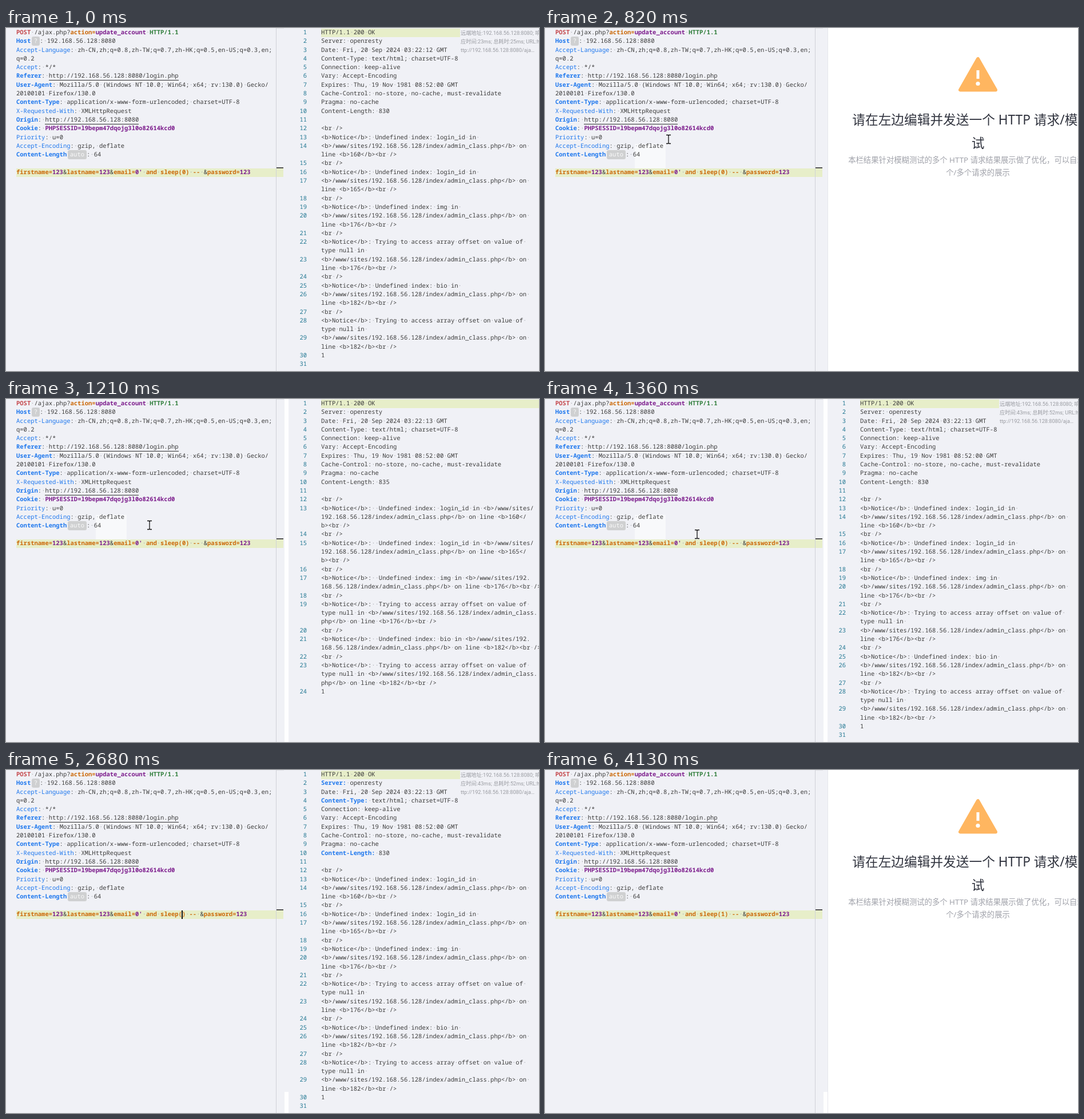
Recreate the animation shown at these times as an HTML page. Size 932x601 px, loop 8 s.

```html
<!DOCTYPE html>
<html lang="zh-CN">
<head>
<meta charset="utf-8">
<title>HTTP request editor</title>
<style>
html, body { margin: 0; width: 100%; height: 100%; overflow: hidden; background: #f0f1f6; }
#stage { position: relative; width: 932px; height: 601px; overflow: hidden; }
#stage > *, .bar { position: absolute; }
.code { top: 1px; white-space: pre; color: #3c3c3c; text-rendering: geometricPrecision;
  font: 10.51px/15.3px "Noto Sans Mono", "DejaVu Sans Mono", monospace; }
.code div { height: 15.3px; position: relative; }
.code i { font-style: normal; color: #a3a5ab; font-weight: 400; }
.code u { position: absolute; right: 100%; margin-right: 25px; text-decoration: none; color: #237893; }
.bar { background: #e7eec9; height: 15.3px; }
.key, .head { color: #1f78ee; }
.head { font-weight: 700; }
.plain .head { font-weight: 400; }
.plain .badge { display: none; }
.badge { background: #cfd0d1; color: #fafafa; border-radius: 3px; padding: 1px 4px; margin-left: 1.6px; font-weight: 400; }
.link { border-bottom: 1px solid #333; }
.verb { color: #c4474b; }
.name { color: #cc6a0a; }
.value { color: #7c1c8c; }
.proto { color: #2f7d3a; }
#info { left: 794px; top: 1px; width: 138px; height: 45px; padding-left: 1px; overflow: hidden; white-space: nowrap;
  background: #f0f1f6; color: #999ba1; font: 9.2px/15px Roboto, "Noto Sans CJK SC", sans-serif; }
#empty { left: 494px; top: 0; width: 437px; height: 601px; border-left: 1px solid #e6e7ec; background: #fff; overflow: hidden; }
#empty p { position: absolute; left: 0; width: 524px; margin: 0; text-align: center; white-space: nowrap;
  font-family: "Noto Sans", "Noto Sans CJK SC", sans-serif; }
#empty .title { top: 140px; font-size: 22.7px; line-height: 41px; color: #31343f; }
#empty .hint { top: 220px; font-size: 13.35px; line-height: 22px; color: #a0a2aa; }
#empty svg { position: absolute; left: 226px; top: 48px; }
#patch { left: 157px; top: 203px; width: 54px; height: 43px; background: #f8f9fb; }
#gutter { left: 487px; width: 7px; bottom: 0; background: #fff; }
#divider { left: 472px; top: 0; width: 13px; height: 601px; border-left: 1px solid #cfd1d7; border-top: 1px solid #e0e1e6; }
#mark { left: 473px; top: 244px; width: 12px; height: 2px; background: #555; }
#caret { top: 246px; width: 1.5px; height: 15px; background: #111; }
#mouse { left: -6px; top: -9px; }
</style>
</head>
<body>
<div id="stage">
  <div id="patch"></div>
  <div class="bar" style="left:18px;top:246px;width:467px"></div>
  <div id="request" class="code" style="left:18px"></div>
  <div id="divider"></div>
  <div id="mark"></div>
  <div id="gutter"></div>
  <div class="bar" style="left:551px;top:1px;width:381px"></div>
  <div id="response" class="code" style="left:551px"></div>
  <div id="info"></div>
  <div id="empty">
    <svg width="72" height="66" viewBox="721 48 72 66">
      <path d="M757 54L726 108.5H788Z" fill="#ffb660" stroke="#ffb660" stroke-width="6" stroke-linejoin="round"/>
      <path d="M757 74V89" stroke="#fff" stroke-width="5"/>
      <circle cx="757" cy="97.5" r="3.6" fill="#fff"/>
    </svg>
    <p class="title">请在左边编辑并发送一个 HTTP 请求/模糊测<br>试</p>
    <p class="hint">本栏结果针对模糊测试的多个 HTTP 请求结果展示做了优化，可以自动切换单<br>个/多个请求的展示</p>
  </div>
  <div id="caret"></div>
  <svg id="mouse" width="12" height="18" viewBox="-6 -9 12 18">
    <path d="M-4-7.5H-1L0-6.5L1-7.5H4M0-6.5V6.5M-4 7.5H-1L0 6.5L1 7.5H4" fill="none" stroke="#111" stroke-width="1.3"/>
  </svg>
</div>
<script>
const LOOP = 8000;
const $ = id => document.getElementById(id);
const span = (cls, text) => `<span class=${cls}>${text}</span>`;
const bold = (cls, text) => `<b class=${cls}>${text}</b>`;
const escape = s => s.replace(/</g, '&lt;').replace(/>/g, '&gt;');
const showSpaces = html => html.replace(/ (?![^<>]*>)/g, '<i>·</i>');
const row = html => `<div>${showSpaces(html)}</div>`;

const key = (name, value) => span('key', name) + ': ' + value;
const head = (name, value, badge) =>
  bold('head', name) + (badge ? span('badge', badge) : '') + ': ' + value;
const param = (name, value) => bold('name', name + '=') + bold('value', value);

function request(digit) {
  const host = '192.168.56.128:8080';
  return [
    bold('verb', 'POST') + ' /ajax.php?' + param('action', 'update_account') + ' ' + bold('proto', 'HTTP/1.1'),
    head('Host', host, '?'),
    key('Accept-Language', 'zh-CN,zh;q=0.8,zh-TW;q=0.7,zh-HK;q=0.5,en-US;q=0.3,en;'),
    'q=0.2',
    key('Accept', '*/*'),
    head('Referer', span('link', `http://${host}/login.php`)),
    head('User-Agent', 'Mozilla/5.0 (Windows NT 10.0; Win64; x64; rv:130.0) Gecko/'),
    '20100101 Firefox/130.0',
    head('Content-Type', 'application/x-www-form-urlencoded; charset=UTF-8'),
    key('X-Requested-With', 'XMLHttpRequest'),
    head('Origin', span('link', `http://${host}`)),
    head('Cookie', bold('value', 'PHPSESSID=l9bepm47dqojg3l0o82614kcd0')),
    key('Priority', 'u=0'),
    key('Accept-Encoding', 'gzip, deflate'),
    head('Content-Length', '64', 'auto'),
    '',
    param('firstname', '123') + '&amp;' + param('lastname', '123') + '&amp;' + param('email', "0'") +
      bold('name', ` and sleep(${digit}) -- `) + '&amp;' + param('password', '123')
  ].map(row).join('');
}

const NOTICES = [['login_id', 160], ['login_id', 165], ['img', 176], ['', 176], ['bio', 182], ['', 182]];

// "|" marks a soft wrap inside a numbered line.
function notice([index, line], raw) {
  const message = index ? `Undefined index: ${index} in ` : 'Trying to access array offset on value of |type null in ';
  const path = '<b>/www/sites/192.168.56.128/index/admin_class.php</b>';
  if (!raw) return ['<br />', '<b>Notice</b>: ' + message, `${path} on |line <b>${line}</b><br />`];
  let text = `<b>Notice</b>:  ${message}${path} on line <b>${line}</b><br />`;
  if (!index) text = text.replace('class.php', 'class.|php');
  else if (index === 'login_id') text = text.replace('sites/', 'sites/|').replace('</b><br', '</|b><br');
  else text = text.replace('192.', '192.|');
  return ['<br />', text];
}

function response({ second, raw, lit }) {
  const lines = [
    'HTTP/1.1 200 OK', 'Server: openresty', `Date: Fri, 20 Sep 2024 03:22:${second} GMT`,
    'Content-Type: text/html; charset=UTF-8', 'Connection: keep-alive', 'Vary: Accept-Encoding',
    'Expires: Thu, 19 Nov 1981 08:52:00 GMT', 'Cache-Control: no-store, no-cache, must-revalidate',
    'Pragma: no-cache', `Content-Length: ${raw ? 835 : 830}`, '',
    ...NOTICES.flatMap(n => notice(n, raw)), '1', ...(raw ? [] : [''])
  ];
  return lines.map((line, i) => line.split('|').map((part, j) => {
    let html = escape(part);
    if (lit) html = html.replace(/^(Server|Content-Type|Content-Length):/, m => bold('head', m));
    return row((j ? '' : `<u>${i + 1}</u>`) + html);
  }).join('')).join('');
}

const info = (wait, total) =>
  `远端地址:192.168.56.128:8080; 响<br>应时间:${wait}ms; 总耗时:${total}ms; URL:h<br>ttp://192.168.56.128:8080/aja…`;

// Each track is a list of [start time, value]; values hold until the next entry.
const first = { second: 12, info: info(23, 25) };
const second = { second: 13, info: info(43, 52) };
const tracks = {
  response: [[0, first], [120, { ...first, lit: true }], [400, null], [970, { second: 13, raw: true }],
    [1360, second], [1630, { ...second, lit: true }], [4130, null]],
  digit: [[0, '0'], [2090, ''], [2800, '1']],
  plain: [[0, false], [2090, true], [2680, false], [2800, true], [2920, false]],
  caret: [[0, null], [1940, 307], [2800, 313.5], [3220, null]],
  mouse: [[0, null], [520, [162, 190]], [660, [210, 194]], [820, [216, 195]], [970, [222, 184]],
    [1090, [235, 203]], [1210, [251, 221]], [1360, [266, 237]], [1490, [291, 249]], [1630, [312, 254]],
    [2090, [316, 255]], [2240, null], [2920, [128, 45]], [3070, null]],
  patch: [[0, false], [520, true], [2090, false]],
  gutter: [[0, 0], [970, 601], [1630, 37]]
};
tracks.digit.unshift();

const show = (id, on) => { $(id).style.display = on ? '' : 'none'; };
const apply = {
  response(r) {
    show('empty', !r);
    show('info', r && r.info);
    if (!r) return;
    $('response').innerHTML = response(r);
    $('info').innerHTML = r.info || '';
  },
  digit(d) { $('request').innerHTML = request(d); },
  plain(on) { $('request').classList.toggle('plain', on); },
  caret(x) { show('caret', x); $('caret').style.left = x + 'px'; },
  mouse(p) {
    show('mouse', p);
    if (p) $('mouse').style.transform = `translate(${p[0]}px, ${p[1]}px)`;
  },
  patch(on) { show('patch', on); },
  gutter(h) { $('gutter').style.height = h + 'px'; }
};

const current = {};
function frame() {
  const t = performance.now() % LOOP;
  for (const name in tracks) {
    const step = tracks[name].findLast(([start]) => start <= t);
    if (current[name] !== step) {
      current[name] = step;
      apply[name](step[1]);
    }
  }
  requestAnimationFrame(frame);
}
frame();
</script>
</body>
</html>
```
